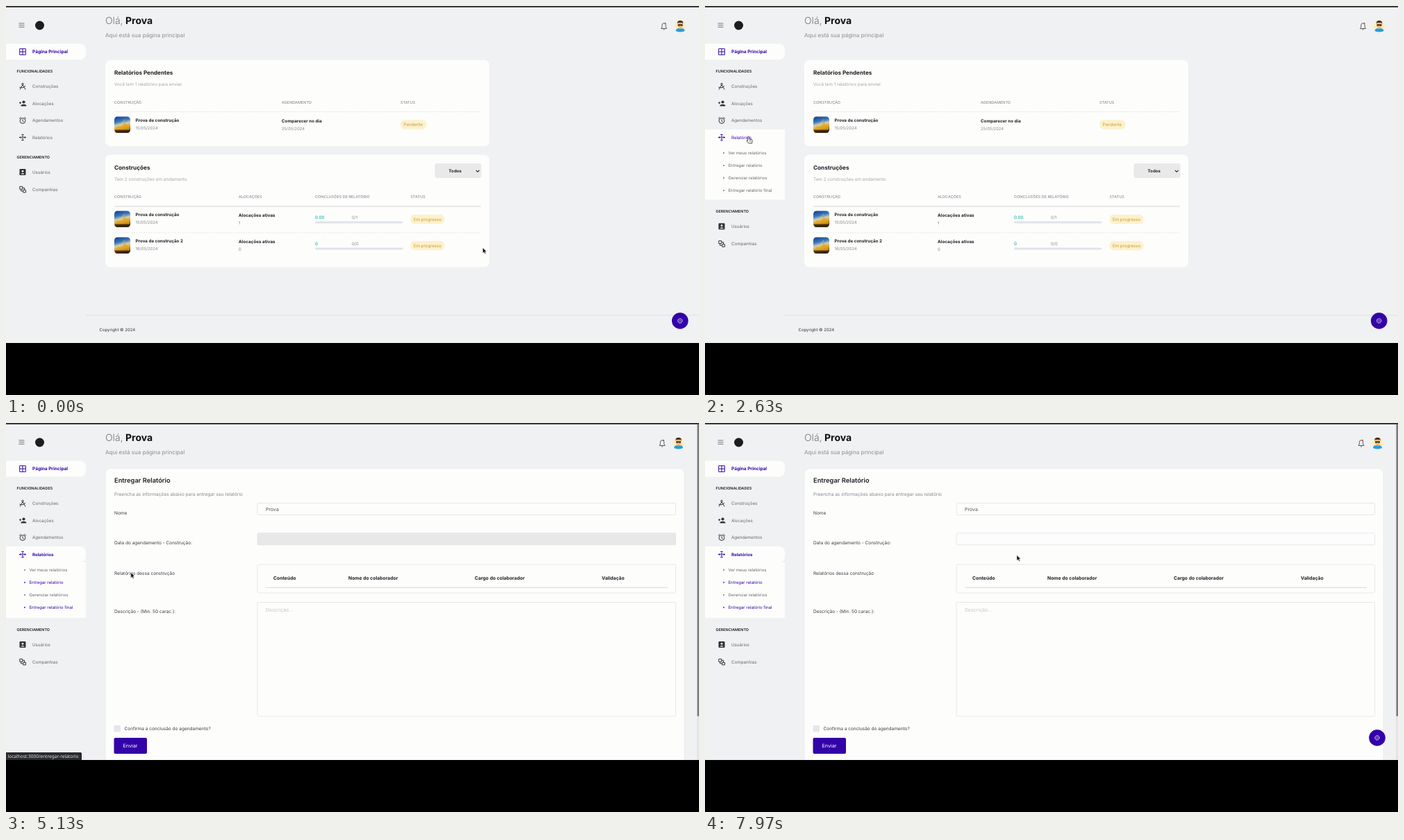
Write an HTML page that moves like this. It is 998x561 px and loops after 8 s.

```html
<!DOCTYPE html>
<html lang="pt">
<head>
<meta charset="utf-8">
<title>Painel de construções</title>
<style>
html, body { margin: 0; width: 100%; height: 100%; overflow: hidden; background: #000; }
svg { display: block; width: 100vw; height: 100vh; }
text { font-family: Inter, "Open Sans", sans-serif; text-rendering: geometricPrecision; white-space: pre; }
#status text { font-family: "Noto Sans", sans-serif; }
.item { color: #333; }
.item text { fill: #666; }
.item.on { color: #3302a8; }
.item.on text { fill: #3302a8; }
.item.bold text { font-weight: 700; }
</style>
</head>
<body>
<svg id="stage" viewBox="0 0 998 561" preserveAspectRatio="none"></svg>
<script>
const INK = '#1f1f24', GREY = '#a3a5a9', BLUE = '#3302a8', PAPER = '#fdfdfc', BACK = '#eff1f2';
const USER = 'Prova';

// y is the middle of the capitals
const text = (x, y, s, size, fill = INK, weight = 400, extra = '') =>
  `<text x="${x}" y="${(y + size * .36).toFixed(2)}" font-size="${size}" fill="${fill}" font-weight="${weight}" ${extra}>${s}</text>`;
const rect = (x, y, w, h, fill, r = 0, extra = '') =>
  `<rect x="${x}" y="${y}" width="${w}" height="${h}" rx="${r}" fill="${fill}" ${extra}/>`;
const line = (x1, x2, y, color = '#d9dadd', dash = '') =>
  `<path d="M${x1} ${y}H${x2}" stroke="${color}" stroke-width=".8" stroke-dasharray="${dash}"/>`;
const group = (id, body, extra = '') => `<g id="${id}" ${extra}>${body}</g>`;
const heads = (y, list) => list.map(([x, s]) => text(x, y, s, 5.5, '#8f9196', 500)).join('');

const icons = {
  grid: '<path d="M-4.3-4.3H4.3V4.3H-4.3ZM0-4.3V4.3M-4.3 0H4.3"/>',
  compass: '<path d="M-4 4.5L0-2.5L4 4.5M-4.5 1Q0 3.5 4-1"/><circle cy="-3.5" r="1.2"/>',
  person: '<g fill="currentColor" stroke="none"><circle cx="1.5" cy="-2" r="2.1"/><path d="M-2.5 4V2.6Q1.5-.2 5.3 2.6V4Z"/></g><path d="M-5-.8H-1.8M-3.4-2.4V.8"/>',
  alarm: '<circle cy=".5" r="3.9"/><path d="M0-1.7V.8L1.7 1.8M-4.8-2.6L-2.4-4.6M4.8-2.6L2.4-4.6"/>',
  report: '<path d="M-5 0H-2.5M2.5 0H5M-3.5-1.4L-2.2 0L-3.5 1.4M3.5-1.4L2.2 0L3.5 1.4M-1.7-4H1.7M-1.7 4H1.7M0-4V-2M0 2V4"/><circle r="1.2"/>',
  account: '<path d="M-4-4H4V4H-4Z" fill="currentColor"/><circle cy="-1.2" r="1.4" fill="#fff" stroke="none"/><path d="M-2.8 3Q0-.2 2.8 3Z" fill="#fff" stroke="none"/>',
  company: '<path d="M-4.2-4.2H-.2V-.2H-4.2ZM.8.8H4.4V4.4H.8ZM-2.4 0V2.4H.6M0-2.2H2.6V.6"/>'
};
const item = (id, y, icon, label) => `<g id="${id}" class="item">
  <path class="pill" d="M0 ${y - 11.5}H106Q115 ${y - 11.5} 115 ${y - 2.5}V${y + 2.5}Q115 ${y + 11.5} 106 ${y + 11.5}H0Z" fill="${PAPER}"/>
  <g transform="translate(24 ${y})" fill="none" stroke="currentColor" stroke-width="1">${icons[icon]}</g>
  ${text(38, y, label, id === 'home' ? 6.5 : 6.2, '')}</g>`;

const submenu = ['Ver meus relatórios', 'Entregar relatório', 'Gerenciar relatórios', 'Entregar relatório final'];
const sidebar = `
  <path d="M18.5 25H26.5M18.5 27.7H26.5M18.5 30.4H26.5" stroke="#555" stroke-width=".8"/>
  <circle cx="48.5" cy="28" r="6.5" fill="#1d1d1d"/>
  ${item('home', 66, 'grid', 'Página Principal')}
  ${text(15.5, 94.5, 'FUNCIONALIDADES', 5.4, INK, 600)}
  ${item('works', 116, 'compass', 'Construções')}
  ${item('allocs', 140.5, 'person', 'Alocações')}
  ${item('dates', 165, 'alarm', 'Agendamentos')}
  <clipPath id="subclip"><rect id="subrect" y="201" width="116"/></clipPath>
  ${group('submenu', rect(0, 201, 115, 80, PAPER) +
    submenu.map((s, i) => group('sub' + i, `<circle cx="27" cy="${212 + 18 * i}" r="1.1" opacity=".8"/>` +
      text(33.5, 212 + 18 * i, s, 6, 'inherit'))).join(''), 'clip-path="url(#subclip)"')}
  ${rect(0, 178, 115, 23, PAPER, 0, 'id="corner"')}
  ${item('reports', 189.5, 'report', 'Relatórios')}
  ${group('lower', text(15.5, 218, 'GERENCIAMENTO', 5.4, INK, 600) +
    item('users', 239.5, 'account', 'Usuários') + item('firms', 264.5, 'company', 'Companhias'))}`;

const header = text(143, 21, 'Olá,', 14, '#777', 300) + text(172, 21, USER, 14, '#111', 700) +
  text(143, 42, 'Aqui está sua página principal', 8.05, '#8b8d91') +
  group('tools', `
    <path d="M943.5 32.5H951.5L950.2 30.5V27.5Q950 25 947.5 24.7Q945 25 944.8 27.5V30.5ZM946.5 34H948.5" fill="none" stroke="#333" stroke-width=".8"/>
    <circle cx="949.5" cy="25" r="1.1" fill="#e23b4e"/>
    <circle cx="971" cy="29" r="8" fill="#fdeeb5"/>
    <path d="M964.5 36Q965 31 971 32.5Q977 31 977.5 36Q971 39 964.5 36Z" fill="#2d9bd8"/>
    <ellipse cx="971" cy="27.5" rx="3.6" ry="5" fill="#f3b57e"/>
    <path d="M967 26Q966 21 971 21Q976 21 975 26L974 24H968Z" fill="#4a2c1c"/>
    <path d="M967.5 26.5H974.5V28.5H971.6L971 27.5L970.4 28.5H967.5Z" fill="#222"/>`);

const thumb = y => rect(156, y, 23, 23.5, 'url(#sky)', 4.5) +
  `<path d="M157 ${y + 19}L161 ${y + 14}L166 ${y + 15}L171 ${y + 9}L178 ${y + 14}V${y + 20}H157Z" fill="#e5a51e" opacity=".75"/>
   <path d="M163 ${y + 14}L171 ${y + 4}" stroke="#e8c65a" stroke-width=".8"/>
   <path d="M156.5 ${y + 19}H178.5Q178 ${y + 23} 175 ${y + 23.5}H160Q157 ${y + 23} 156.5 ${y + 19}Z" fill="#33240f" opacity=".8"/>`;
const badge = (x, y, w, s) => rect(x, y - 6.7, w, 13.4, '#fcf1cd', 6) + text(x + 4.5, y, s, 6.15, '#c99a2e');
const work = (y, name, date, count, done, total) => thumb(y - 12) +
  text(186.5, y - 6.5, name, 6.25, INK, 700) + text(186.5, y + 4.5, date, 5.9, '#85878c') +
  text(335, y - 5.5, 'Alocações ativas', 6.3, INK, 700) + text(335, y + 5.5, count, 6, '#85878c') +
  text(445, y - 3, done, 6.2, '#20b8ad', 500) + text(498, y - 3, total, 6, '#85878c') +
  rect(445, y + 3, 126.5, 3, '#dfe4ea', 1.5) + badge(582.5, y, 49, 'Em progresso');

const dashboard = rect(143, 78, 553, 124, PAPER, 7) +
  text(156, 96.5, 'Relatórios Pendentes', 8.15, INK, 700) +
  text(156, 112.5, 'Você tem 1 relatórios para enviar.', 6.3, GREY) +
  heads(139, [[156, 'CONSTRUÇÃO'], [397, 'AGENDAMENTO'], [568, 'STATUS']]) +
  line(156, 684, 152.5, '#dddee0', '2 1.5') + thumb(159.5) +
  text(186.5, 164.5, USER + ' de construção', 6.25, INK, 700) + text(186.5, 175.5, '15/05/2024', 5.9, '#85878c') +
  text(397, 165.5, 'Comparecer no dia', 6.25, INK, 700) + text(397, 176.5, '25/05/2024', 5.9, '#85878c') +
  badge(568, 171, 37.5, 'Pendente') +
  rect(143, 214.5, 553, 162, PAPER, 7) +
  text(156, 233, 'Construções', 8.2, INK, 700) +
  text(156, 249.5, 'Tem 2 construções em andamento.', 6.4, GREY) +
  rect(617.5, 227, 67, 21, '#e9e9ea', 3) + text(637.5, 238, 'Todos', 6.15, INK, 700) +
  '<path d="M677 237L679.3 239.3L681.6 237" fill="none" stroke="#222" stroke-width="1.1"/>' +
  heads(275.5, [[156, 'CONSTRUÇÃO'], [335, 'ALOCAÇÕES'], [445, 'CONCLUSÕES DE RELATÓRIO'], [582.5, 'STATUS']]) +
  line(156, 684, 289, '#c9cbcf') + work(307.5, USER + ' de construção', '15/05/2024', '1', '0.00', '0/1') +
  line(156, 684, 327, '#dddee0', '2 1.5') + work(345.5, USER + ' de construção 2', '16/05/2024', '0', '0', '0/0') +
  line(115, 998, 446, '#dadcdf') + text(134.5, 466.5, 'Copyright © 2024', 6, '#333');

const box = (y, h, fill = PAPER, extra = '') =>
  rect(362, y, 602.5, h, fill, 1.5, `stroke="#e2e3e5" stroke-width=".8" ${extra}`);
const form = rect(143, 65.5, 834, 440, PAPER, 8, 'stroke="#e9ebec" stroke-width=".8"') +
  text(156, 83, 'Entregar Relatório', 9.3, INK, 600) +
  text(156, 103, 'Preencha as informações abaixo para entregar seu relatório', 6.55, '#7f8a8a') +
  [[129.5, 'Nome'], [173, 'Data do agendamento - Construção:'], [217, 'Relatórios dessa construção'],
   [271.5, 'Descrição - (Min. 50 carac.):']].map(([y, s]) => text(156, y, s, 6.5, '#3c3d42')).join('') +
  box(115.5, 17) + text(374, 124, USER, 7, '#555') +
  box(158.8, 17, '', 'id="field"') + box(204, 41) +
  [[385, 'Conteúdo'], [493, 'Nome do colaborador'], [675, 'Cargo do colaborador'], [858, 'Validação']]
    .map(([x, s]) => text(x, 224, s, 6.8, INK, 700)).join('') +
  line(374, 953, 237.3, '#d0d2d6') + box(258.5, 164.5) + text(374, 269, 'Descrição...', 7, '#c3c5c9') +
  rect(155.5, 436, 9.5, 9.5, '#e5e7eb', 1.5) + text(170.5, 441, 'Confirma a conclusão do agendamento?', 6.5, '#3c3d42') +
  rect(155.5, 454, 47.5, 23, BLUE, 2) + text(168.5, 465.5, 'Enviar', 7.2, '#fff') +
  rect(995, 2, 3, 484, '#e3e4e6') + rect(995.5, 2, 2.5, 421, '#77797c', 1);

stage.innerHTML = `
  <defs>
    <linearGradient id="sky" x2=".25" y2="1"><stop stop-color="#123a86"/><stop offset=".35" stop-color="#3779bd"/>
      <stop offset=".55" stop-color="#d5ceb0"/><stop offset=".75" stop-color="#e3a323"/><stop offset="1" stop-color="#33230f"/></linearGradient>
    <clipPath id="screen"><rect width="998" height="486"/></clipPath>
  </defs>
  ${rect(0, 0, 998, 561, '#000')}
  <g clip-path="url(#screen)">
    ${rect(0, 0, 998, 486, BACK)}
    ${group('dashboard', dashboard)}${group('form', form)}
    ${header}${sidebar}
    ${group('gear', `<circle r="11.8" fill="${BLUE}"/><g fill="none" stroke="#fff" stroke-opacity=".85">
      <circle r="3.3" stroke-width=".9" stroke-dasharray="1.5 1.092"/><circle r="2.8" stroke-width=".5"/><circle r="1.1" stroke-width=".5"/></g>`)}
    ${rect(0, 0, 998, 2, '#35373a')}
    ${group('status', '<path id="statusbox" fill="#2a2b2e"/>' + text(2.5, 480.5, '', 6.55, '#e4e4e4', 400, 'id="address"'))}
    ${group('arrow', '<path d="M0 0V8L1.9 6.3L3.1 9L4.5 8.4L3.3 5.8H5.6Z" fill="#111" stroke="#fff" stroke-width=".5"/>')}
    ${group('hand', '<path d="M-.9 0Q0-.9.9 0V3.3L5 4.3Q6 4.7 5.7 6L5 9.5H.5L-2.6 5.8Q-2.5 4.6-.9 5.8Z" fill="#fff" stroke="#222" stroke-width=".8"/><path d="M2 5V7M3.5 5.2V7" stroke="#222" stroke-width=".6"/>')}
  </g>`;

const $ = id => document.getElementById(id);
const show = (id, on) => $(id).style.display = on ? '' : 'none';
const move = (id, x, y) => $(id).setAttribute('transform', `translate(${x.toFixed(2)} ${y.toFixed(2)})`);
const ramp = (t, from, to) => Math.min(1, Math.max(0, (t - from) / (to - from)));
const ease = k => k * k * (3 - 2 * k);

// time, x, y of the pointer tip
const path = [[0, 686.5, 348.5], [400, 686.5, 348.5], [1850, 62.5, 188.5], [2700, 62.5, 188.5], [3150, 78, 229],
  [4850, 78, 229], [5650, 436.8, 181.5], [5900, 436.8, 181.5], [6450, 444.8, 163.7], [7150, 444.8, 163.7], [7700, 449, 190.5], [8000, 449, 190.5]];
function pointer(t) {
  const i = Math.max(1, path.findIndex(p => p[0] > t));
  const [t0, x0, y0] = path[i - 1], [t1, x1, y1] = path[i], k = ease(ramp(t, t0, t1));
  return [x0 + (x1 - x0) * k, y0 + (y1 - y0) * k];
}

function mark(id, on, bold = false) {
  const el = $(id);
  el.classList.toggle('on', on);
  el.classList.toggle('bold', bold);
  el.querySelector('.pill').style.opacity = +on;
}

function render(t) {
  const onForm = t >= 4200;
  const open = ease(onForm ? ramp(t, 4400, 4740) : ramp(t, 2320, 2660));
  const [x, y] = pointer(t), inside = x < 115;
  const over = (top, bottom) => inside && y >= top && y < bottom;

  show('dashboard', !onForm);
  show('form', onForm);
  move('tools', onForm ? -2.5 : 0, 0);

  show('submenu', open > 0);
  show('corner', !onForm && open > 0);
  $('subrect').setAttribute('height', 80 * open);
  move('lower', 0, 80 * open);
  mark('home', true, true);
  for (const id of ['works', 'allocs', 'dates', 'firms']) mark(id, false);
  mark('reports', over(178, 201) || open > 0, onForm);
  mark('users', over(228 + 80 * open, 251 + 80 * open));
  submenu.forEach((s, i) => {
    const hover = open === 1 && over(203 + 18 * i, 221 + 18 * i);
    $('sub' + i).setAttribute('fill', onForm && i % 2 ? BLUE : hover ? '#111' : '#666');
  });

  const rise = onForm ? 1 - (1 - ramp(t, 5500, 5950)) ** 2 : 1;
  move('gear', onForm ? 968 : 970.7, 454 + 19 * (1 - rise));
  $('gear').style.opacity = rise;

  const atUsers = onForm && open < .5, width = atUsers ? 135.5 : 109;
  show('status', t >= 3000 && t < 5250);
  $('address').textContent = 'localhost:3000/entregar-relatorio' + (atUsers ? '#usuario' : '');
  $('statusbox').setAttribute('d', `M0 475H${width - 1.5}Q${width} 475 ${width} 476.5V486H0Z`);

  const grey = Math.round(232 + 21 * ramp(t, 7000, 7150));
  $('field').setAttribute('fill', `rgb(${grey},${grey},${grey})`);

  show('arrow', !inside);
  show('hand', inside);
  move(inside ? 'hand' : 'arrow', x, y);
}

const start = performance.now();
function tick() {
  render((performance.now() - start) % 8000);
  requestAnimationFrame(tick);
}
tick();
</script>
</body>
</html>
```
